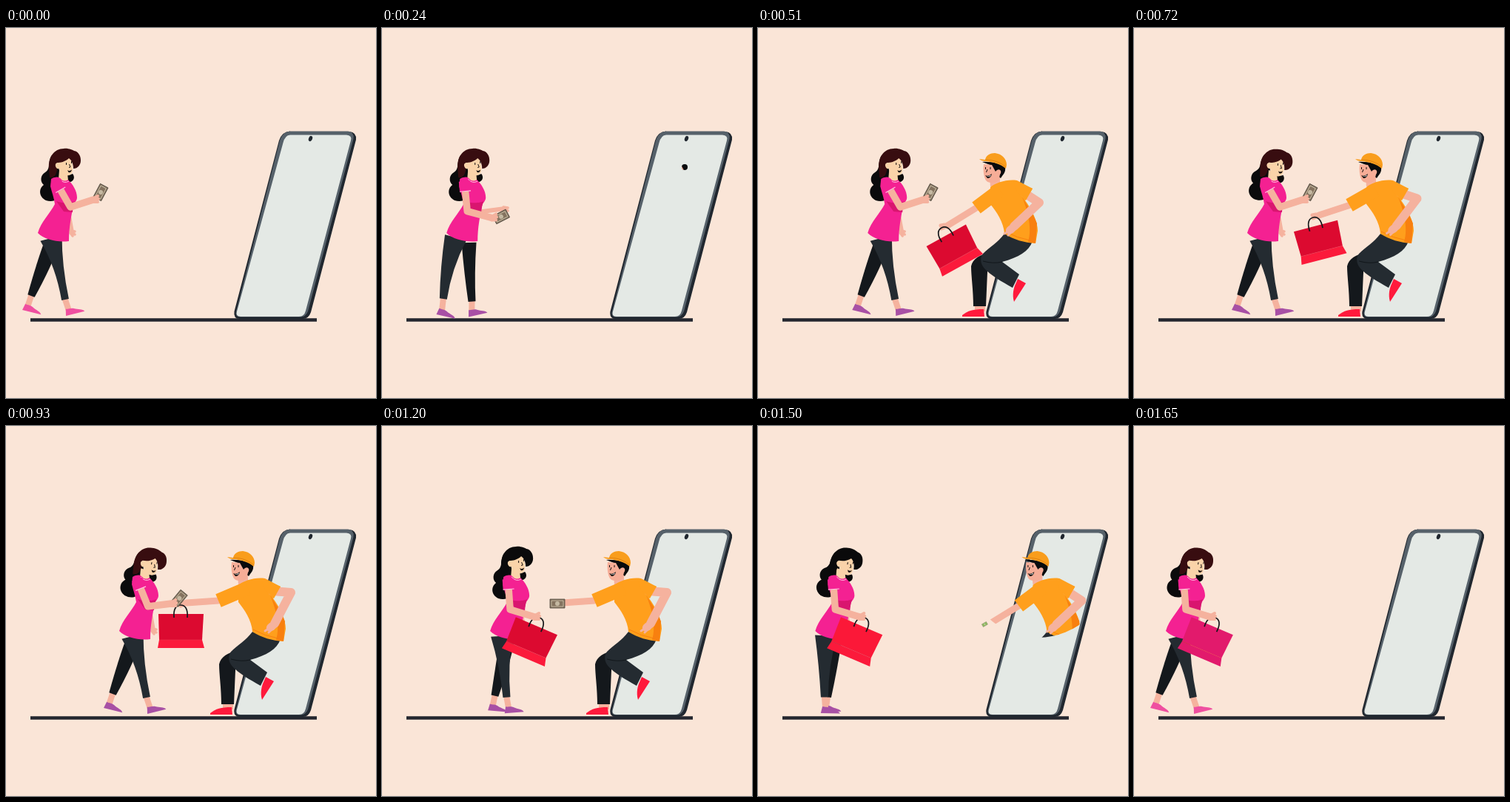
Animation of 500x500 px, one loop 1.83 s. Source, as an HTML page:

```html
<!DOCTYPE html>
<html lang="en">
<head>
<meta charset="utf-8">
<title>Delivery from a phone</title>
<style>
html, body { margin: 0; width: 100%; height: 100%; overflow: hidden; background: #fae5d7; }
svg { display: block; width: 100vw; height: 100vh; }
.line { fill: none; stroke-linejoin: round; }
.skin { fill: #f5b29e; }
.skinLine { stroke: #f5b29e; stroke-linecap: round; }
.shirt { fill: #ff9f1c; }
.dress { fill: #f42192; }
.navy { fill: #242b31; }
.black { fill: #14181c; }
.red { fill: #ff1a3c; }
.face { fill: #fad3a9; }
.hair { fill: var(--hair); }
.shoe { fill: var(--shoe); }
</style>
</head>
<body>
<svg id="stage" viewBox="0 0 500 500">
  <defs>
    <clipPath id="portal"><circle id="reveal" cx="321" cy="188" r="0"/></clipPath>
  </defs>

  <path fill="#23262e" d="M33 392.300H420V396.700H33Z"/>

  <g id="device">
    <path fill="#20272f" d="M384 140H464Q474 141 473 151L412 384Q409 393 401 393H316Q307 393 308.500 383L369 152Q373 140 384 139.500Z"/>
    <path fill="#56616a" d="M384 139.500H462Q471 140 469.500 150L408 383Q405 390.500 398 390.500H318Q309 391 311 383L370 152Q374 140 384 139.500Z"/>
    <path fill="#e4e9e5" d="M384 144.500H460Q468 145 466 152L405 382Q403 390 396 390H317Q310 390 312 383L374.500 155Q377 145 384 144.500Z"/>
    <ellipse cx="411.500" cy="149.500" rx="2.500" ry="3.700" fill="#20272f" transform="rotate(20 411.500 149.500)"/>
  </g>

  <g id="man"><g clip-path="url(#portal)">
    <path class="skin" d="M293 374H307V383H293Z"/>
    <path class="red" d="M276 388C284 382 290 380 305 380L306 390H276Z"/>
    <path class="black" d="M288 322C290 312 300 306 312 304L310 330L308 376H291C291 355 288 335 288 322Z"/>
    <path id="rearShoe" class="red" d="M351 339L362 345L346 370C343 360 346 350 348 346Z"/>
    <path class="navy" d="M333 278C345 284 360 289 371 288C366 302 352 310 330 316L353 333L344 351C330 343 314 334 306 325C300 318 300 310 304 305C312 297 324 290 333 278Z"/>
    <path class="line" stroke="#11161a" d="M304 315Q318 319 330 316"/>
    <path class="skin" d="M313 202L327 199V213Q320 218 314 214Z"/>
    <path class="shirt" d="M314 215C322 209 336 204 350 206L371 217C368 223 364 228 361 233C370 245 378 262 378 274L375 291C360 290 345 286 333 278C332 262 322 248 314 238Z"/>
    <path fill="#f8800f" d="M355 224C360 236 370 246 377 264L375 291L365 289C371 270 364 244 355 224Z"/>
    <path class="line" stroke="#f8800f" d="M334 275Q350 284 368 287"/>
    <path id="rearArm" class="line skinLine" stroke-width="12"/>
    <path class="shirt" d="M345 206L371 217L362 233L350 222Z"/>
    <g id="rearHand" class="skin"><ellipse rx="8" ry="5.500" transform="rotate(-35)"/><path class="line skinLine" stroke-width="3" d="M-3 2L-9 6M0 4L-4 8"/></g>
    <path id="frontArm" class="line skinLine" stroke-width="9"/>
    <path id="frontHand" class="line skinLine" stroke-width="5" d="M0-1L-5 0M1 2L-4 4"/>
    <path id="frontSleeve" class="line" stroke="#ff9f1c" stroke-width="19"/>
    <path fill="#090b0d" d="M303 181C315 180 330 183 334 189C335 195 331 198 328 203L320 196L316 186Z"/>
    <path fill="#f6ad97" d="M305 184L316 185L321 194C325 188 331 193 327 198L325 206C320 211 309 210 307 204C305 199 304 192 305 184Z"/>
    <path fill="#f99d1c" d="M299 177L307 178C308 172 314 169 320 169C330 170 336 177 336 185L335 190C328 184 318 181 308 180Q302 180 299 177Z"/>
    <path class="line" stroke="#d97c12" stroke-width=".8" d="M307 178Q324 178 335 188"/>
    <path fill="#15110f" d="M307 199Q311 201 316 197Q315 203 310 203Z"/>
    <path fill="#fff" d="M308.500 199.500Q311 201 315 198.500L314 200.500H310Z"/>
    <path class="line" stroke="#15110f" d="M307.500 188V191M314 188V191M310 191L308.500 195"/>
  </g></g>

  <g id="woman">
    <path id="farArm" class="line skinLine" stroke-width="6"/>
    <path id="farHand" class="line skinLine" stroke-width="3.500" d="M-2-2L4-1M-2 0L4 3M-2 1L1 5"/>
    <g id="farLeg"><path class="line skinLine" stroke-width="8"/><path class="shoe"/><path class="black"/></g>
    <g id="nearLeg"><path class="line skinLine" stroke-width="8"/><path class="shoe"/><path class="navy"/></g>
    <g id="hairBack" fill="#0b0b0c">
      <path d="M62 172C56 180 61 190 53 195C46 199 46 208 51 212C44 217 44 228 54 233C60 235 66 234 69 231L75 204L70 185Z"/>
      <path d="M79 198C84 200 88 198 90 197C94 202 91 207 87 208C83 208 80 205 79 198Z"/>
    </g>
    <path class="face" d="M72 192L83 196L84 206Q78 212 71 204Z"/>
    <path class="dress" d="M61 204C66 201 70 201 73 203Q78 209 84 205C90 211 96 220 96 229C96 234 92 236 91 240C88 255 85 270 85 288C70 290 52 286 43 277C47 262 60 250 66 238C65 230 62 222 60 214Z"/>
    <path fill="#d9156f" d="M68 234C78 238 90 236 93 234C91 239 90 245 90 249L78 248Z"/>
    <path class="line" stroke="#ffc4e0" d="M72 204Q78 211 85 207"/>
    <g id="head">
      <path class="face" d="M67 183C74 181 80 176 85 175C89 179 90 186 90 191C90 198 85 200 81 199C76 198 73 195 72 190C67 191 65 187 67 183Z"/>
      <path class="hair" d="M58 189C57 175 65 163 78 163C84 162 90 165 92 166C98 167 101 173 101 179C101 185 97 190 91 190C91 184 89 179 85 176C80 181 73 182 69 182C65 184 67 188 69 190C69 197 65 204 59 202Z"/>
      <path fill="#17100f" d="M83 192Q86 194 89 191.500Q88 196 84.500 195Z"/>
      <path class="line" stroke="#17100f" d="M81.500 182V185M88.500 180V183M85.500 184L87 188L85 188.500"/>
    </g>
  </g>

  <g id="bag">
    <path id="bagBody" d="M-30 12H31L29 47H-29Z"/>
    <path id="bagFold" d="M-29 47H29L32 58H-31Z"/>
    <path class="line" stroke="#e8354e" stroke-width=".6" d="M-29 47H29"/>
    <path class="line" stroke="#15171a" stroke-width="1.700" d="M-9 17C-10 5-6 0 0 0S10 5 9 17"/>
  </g>

  <g id="money">
    <path id="note" stroke="#4e4a40" stroke-width=".8" d="M-10-6H10V6H-10Z"/>
    <path class="line" stroke="#ded6bd" stroke-width=".7" d="M-8-4H8V4H-8Z"/>
    <circle r="3" fill="#ded6bd" opacity=".7"/>
  </g>

  <g id="womanArm">
    <path id="nearArm" class="line skinLine" stroke-width="9.500"/>
    <path id="nearHand" class="line skinLine" stroke-width="4" d="M-4-1L3-5M-4 1L4-1M-3 3L3 3"/>
    <path id="nearSleeve" class="line" stroke="#f42192" stroke-width="15"/>
    <path id="cuff" class="line" stroke="#ffc4e0" stroke-width="15"/>
  </g>
</svg>

<script>
const LOOP = 1830, STEP = 30, LAST = 1650;
const $ = id => document.getElementById(id);
const set = (el, name, value) => el.setAttribute(name, value);
const lerp = (a, b, p) => a + (b - a) * p;
const mix = (a, b, p) => a.map((v, i) => lerp(v, b[i], p));
const add = (a, b) => a.map((v, i) => v + b[i]);

// Progress 0..1 between two times, and a swing 1 -> 0 -> 1 over the same span.
const ramp = (t, from, to) => Math.min(1, Math.max(0, (t - from) / (to - from)));
const swing = (t, from, to) => Math.abs(1 - 2 * ramp(t, from, to));

const line = (id, ...pts) => set($(id), 'd', 'M' + pts.join('L'));
const place = (id, [x, y], angle = 0, size = 1) =>
  set($(id), 'transform', `translate(${x} ${y}) rotate(${angle}) scale(${size})`);

const nearLeg = {
  width: 30,
  back: { hip: [55, 283], knee: [43, 324], ankle: [36, 366], heel: [26, 387] },
  front: { hip: [61, 284], knee: [71, 324], ankle: [80, 367], heel: [81, 389] }
};
const farLeg = {
  width: 20,
  back: { hip: [62, 290], knee: [50, 322], ankle: [34, 362], heel: [22, 381] },
  front: { hip: [74, 290], knee: [76, 332], ankle: [80, 370], heel: [76, 391] }
};

// Tapered limb: each side is a curve passing through its middle point.
function limb(pts, widths) {
  const side = sign => pts.map(([x, y], i) => {
    const a = pts[Math.max(0, i - 1)], b = pts[Math.min(2, i + 1)];
    const dx = b[0] - a[0], dy = b[1] - a[1];
    const k = sign * widths[i] / 2 / Math.hypot(dx, dy);
    return [x - dy * k, y + dx * k];
  });
  const curve = ([a, b, c]) => `Q${a.map((v, i) => 2 * b[i] - (v + c[i]) / 2)} ${c}`;
  const left = side(1), right = side(-1).reverse();
  return `M${left[0]}${curve(left)}L${right[0]}${curve(right)}Z`;
}

function drawLeg(id, leg, forward) {
  const at = joint => mix(leg.back[joint], leg.front[joint], forward);
  const heel = at('heel'), ankle = at('ankle'), angle = lerp(14, -14, forward);
  const [skin, shoe, trouser] = $(id).children;
  set(skin, 'd', `M${ankle}L${add(heel, [lerp(8, 4, forward), -7])}`);
  set(shoe, 'd', 'M0 0L2-9C6-8 10-9 13-7C18-4 24-4 26 0Z');
  set(shoe, 'transform', `translate(${heel}) rotate(${angle})`);
  set(trouser, 'd', limb([at('hip'), at('knee'), ankle], [leg.width, lerp(18, 14, forward), 10]));
}

function drawWoman(t) {
  const origin = [110 * (ramp(t, 0, 530) ** 1.15 - ramp(t, 1170, 1650)), 0];
  const approach = swing(t, 0, 510);
  const forward = approach * swing(t, 1110, 1650);
  const tilt = 11 * (ramp(t, 510, 900) - ramp(t, 1080, 1200) + ramp(t, 1200, 1380));
  place('woman', origin);
  place('womanArm', origin);
  drawLeg('nearLeg', nearLeg, forward);
  drawLeg('farLeg', farLeg, 1 - forward);
  for (const id of ['head', 'hairBack']) set($(id), 'transform', `rotate(${tilt} 73 212)`);

  const farHand = mix([124, 242], [89, 276], approach);
  line('farArm', [84, 249], farHand);
  place('farHand', farHand);

  const lowered = Math.max(1 - approach, ramp(t, 810, 1200));
  const shoulder = [67, 207];
  const elbow = mix([87, 242], [70, 248], lowered);
  const hand = mix([121, 232], [106, 258], lowered);
  const along = d => mix(shoulder, elbow, d / Math.hypot(elbow[0] - shoulder[0], elbow[1] - shoulder[1]));
  line('nearArm', along(13), elbow, add(hand, [-3, 0]));
  place('nearHand', hand);
  line('nearSleeve', shoulder, along(14));
  line('cuff', along(13), along(14.2));
  return { hand: add(hand, origin), lowered };
}

function drawMan(t) {
  const away = (1 - ramp(t, 240, 480) + ramp(t, 1290, 1560)) ** 1.7;
  const origin = [88 * away, 0];
  place('man', origin);
  set($('man'), 'visibility', t >= 240 && t <= 1560 ? 'visible' : 'hidden');
  set($('reveal'), 'r', 4 + 270 * (1 - away));

  const raised = ramp(t, 540, 900) - ramp(t, 1230, 1380);
  const cuff = mix([295, 243], [287, 236], raised);
  const hand = mix([252, 267], [240, 239], raised);
  line('frontSleeve', [327, 219], cuff);
  line('frontArm', cuff, add(hand, [4, 0]));
  place('frontHand', hand);

  const rearElbow = mix([380, 236], [385, 225], raised);
  const rearHand = mix([342, 272], [359, 271], raised);
  line('rearArm', [360, 223], rearElbow, add(rearHand, [4, -4]));
  place('rearHand', rearHand);

  const thin = 1 - .7 * ramp(t, 1290, 1380);
  set($('rearShoe'), 'transform', `translate(${352 * (1 - thin)} 0) scale(${thin} 1)`);
  return { hand: add(hand, origin), raised, size: 1 - Math.min(1, away) };
}

// Bag and money follow the hand that holds them and swap owners midway.
function drawGoods(t, woman, man) {
  const given = ramp(t, 930, 1110), paid = ramp(t, 930, 1020);

  const bagAt = mix(add(man.hand, [-4, 3]), add(woman.hand, [4, 1]), given);
  const bagAngle = 29 * (ramp(t, 510, 930) - 1) + 23 * ramp(t, 930, 1200);
  place('bag', bagAt, bagAngle, lerp(man.size, 1, given));

  const offset = mix([7, -10], [10, -1], woman.lowered);
  const moneyAt = mix(add(woman.hand, offset), add(man.hand, [-3, 1]), paid);
  const moneyAngle = lerp(lerp(-62, -25, woman.lowered), -30 * (1 - man.raised), paid);
  place('money', moneyAt, moneyAngle, lerp(1, man.size, paid));
}

function paint(t) {
  const style = $('stage').style, leaving = t >= 1290, gone = t >= 1520;
  style.setProperty('--hair', t > 1020 && !gone ? '#0a0a0b' : '#380d10');
  style.setProperty('--shoe', t < 120 || gone ? '#ef4fa0' : '#a850a5');
  set($('bagBody'), 'fill', gone ? '#e21a6c' : leaving ? '#fb1838' : '#dc0a30');
  set($('bagFold'), 'fill', gone ? '#e21a6c' : '#fb1a3b');
  set($('note'), 'fill', leaving ? '#80b551' : '#85735f');
}

function draw(t) {
  paint(t);
  drawGoods(t, drawWoman(t), drawMan(t));
}

let start;
function tick(now) {
  start ??= now;
  const t = (now - start) % LOOP;
  draw(Math.min(LAST, Math.floor(t / STEP) * STEP));
  requestAnimationFrame(tick);
}
draw(0);
requestAnimationFrame(tick);
</script>
</body>
</html>
```
